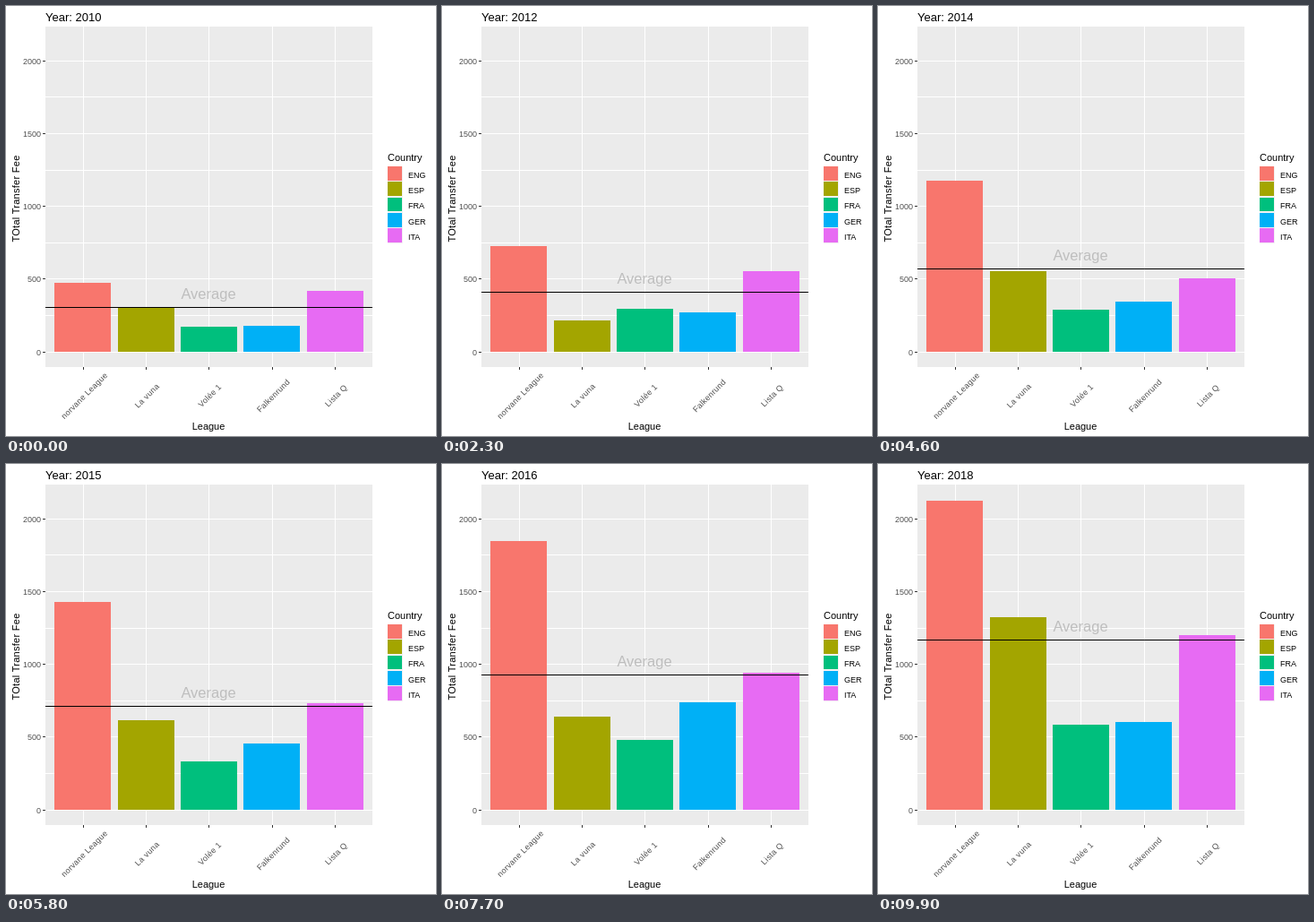
Recreate the animation shown at these times as an HTML page. Size 480x480 px, loop 10000 ms.

```html
<!DOCTYPE html>
<html lang="en">
<head>
<meta charset="utf-8">
<title>Transfer fees by league</title>
<style>
  html, body { margin: 0; width: 100%; height: 100%; overflow: hidden; background: #fff; }
  svg { display: block; width: 480px; height: 480px; }
  text { font-family: "Liberation Sans", Arial, sans-serif; font-size: 11px; }
  rect { shape-rendering: crispEdges; }
  .tick { font-size: 9px; fill: #4d4d4d; }
  .key { font-size: 9px; }
</style>
</head>
<body>
<svg id="chart" viewBox="0 0 480 480"></svg>
<script>
const FRAMES = 100, STEP = 100, FIRST_YEAR = 2010, ZERO = 386;
const panel = { x: 44, y: 23, w: 365, h: 380 };

// Each series: bar left edge and the y of the bar top in every year.
const series = [
  { name: "norvane League", code: "ENG", color: "#f8766d", x: 54,
    tops: [309, 248.5, 271.5, 233, 178, 142, 98, 46, 41] },
  { name: "La vuna", code: "ESP", color: "#a3a500", x: 125,
    tops: [337, 316, 357, 311, 289, 284.5, 294.5, 240, 171] },
  { name: "Volée 1", code: "FRA", color: "#00bf7d", x: 195,
    tops: [358, 353.5, 335, 318, 348, 324, 340, 201, 291] },
  { name: "Falkenrund", code: "GER", color: "#00b0f6", x: 265,
    tops: [357, 349, 341, 331, 329.5, 303.5, 264, 272.5, 288] },
  { name: "Lista Q", code: "ITA", color: "#e76bf3", x: 336,
    tops: [318, 282, 299, 297, 307, 247, 237, 219.5, 191] }
];
const spans = series[0].tops.length - 1;
const keyFrames = series[0].tops.map((_, i) => Math.round(i * (FRAMES - 1) / spans));

const chart = document.getElementById("chart");

function add(tag, attrs, content) {
  const el = document.createElementNS("http://www.w3.org/2000/svg", tag);
  for (const name in attrs) el.setAttribute(name, attrs[name]);
  if (content) el.textContent = content;
  return chart.appendChild(el);
}
const box = (x, y, width, height, fill) => add("rect", { x, y, width, height, fill });
const label = (x, y, content, attrs) => add("text", { x, y, ...attrs }, content);

// Panel, grid and axes
box(panel.x, panel.y, panel.w, panel.h, "#ebebeb");
for (let i = 0; i < 4; i++) {
  box(panel.x, Math.round(345 - i * 81.2), panel.w, 1, "#fff");
}
for (let i = 0; i < 5; i++) {
  const y = Math.round(385.6 - i * 81.2);
  box(panel.x, y, panel.w, 1, "#fff");
  box(41, y, 3, 1, "#333");
  label(39, y + 4, String(i * 500), { class: "tick", "text-anchor": "end" });
}
series.forEach((s, i) => {
  const x = Math.round(86.1 + i * 70.19);
  box(x, panel.y, 1, panel.h, "#fff");
  box(x, panel.y + panel.h, 1, 3, "#333");
  label(0, 3, s.name, {
    class: "tick", "text-anchor": "middle", "letter-spacing": 0.3,
    transform: `translate(${x + 1.5} 435) rotate(-45)`
  });
});
label(226, 473, "League", { "text-anchor": "middle" });
label(0, 0, "TOtal Transfer Fee", {
  "text-anchor": "middle", "letter-spacing": 0.28,
  transform: "translate(15 215) rotate(-90)"
});

// Legend
label(426, 173, "Country");
box(426, 179, 17, 86, "#f2f2f2");
series.forEach((s, i) => {
  const top = Math.round(179 + i * 17.28);
  const bottom = Math.round(194.9 + i * 17.28);
  box(426, top, 16, bottom - top, s.color);
  label(449, bottom - 3, s.code, { class: "key" });
});

// Moving parts
const title = label(44, 17, "", { style: "font-size:13px" });
const bars = series.map(s => box(s.x, ZERO, 63, 0, s.color));
const meanLine = box(panel.x, 0, panel.w, 1, "#000");
const meanText = label(226, 0, "Average", {
  "text-anchor": "middle", fill: "#bebebe", style: "font-size:16.5px"
});

function draw(frame) {
  let k = 0;
  while (k < spans - 1 && frame >= keyFrames[k + 1]) k++;
  const part = (frame - keyFrames[k]) / (keyFrames[k + 1] - keyFrames[k]);
  let sum = 0;
  series.forEach(({ tops }, i) => {
    const top = tops[k] + (tops[k + 1] - tops[k]) * part;
    const y = Math.round(top);
    bars[i].setAttribute("y", y);
    bars[i].setAttribute("height", ZERO - y);
    sum += top;
  });
  const mean = Math.round(sum / series.length + 0.08);
  meanLine.setAttribute("y", mean);
  meanText.setAttribute("y", mean - 9);
  title.textContent = "Year: " + Math.round(FIRST_YEAR + spans * frame / (FRAMES - 1));
}

const start = performance.now();
function tick() {
  draw(Math.floor((performance.now() - start) / STEP) % FRAMES);
  requestAnimationFrame(tick);
}
tick();
</script>
</body>
</html>
```
